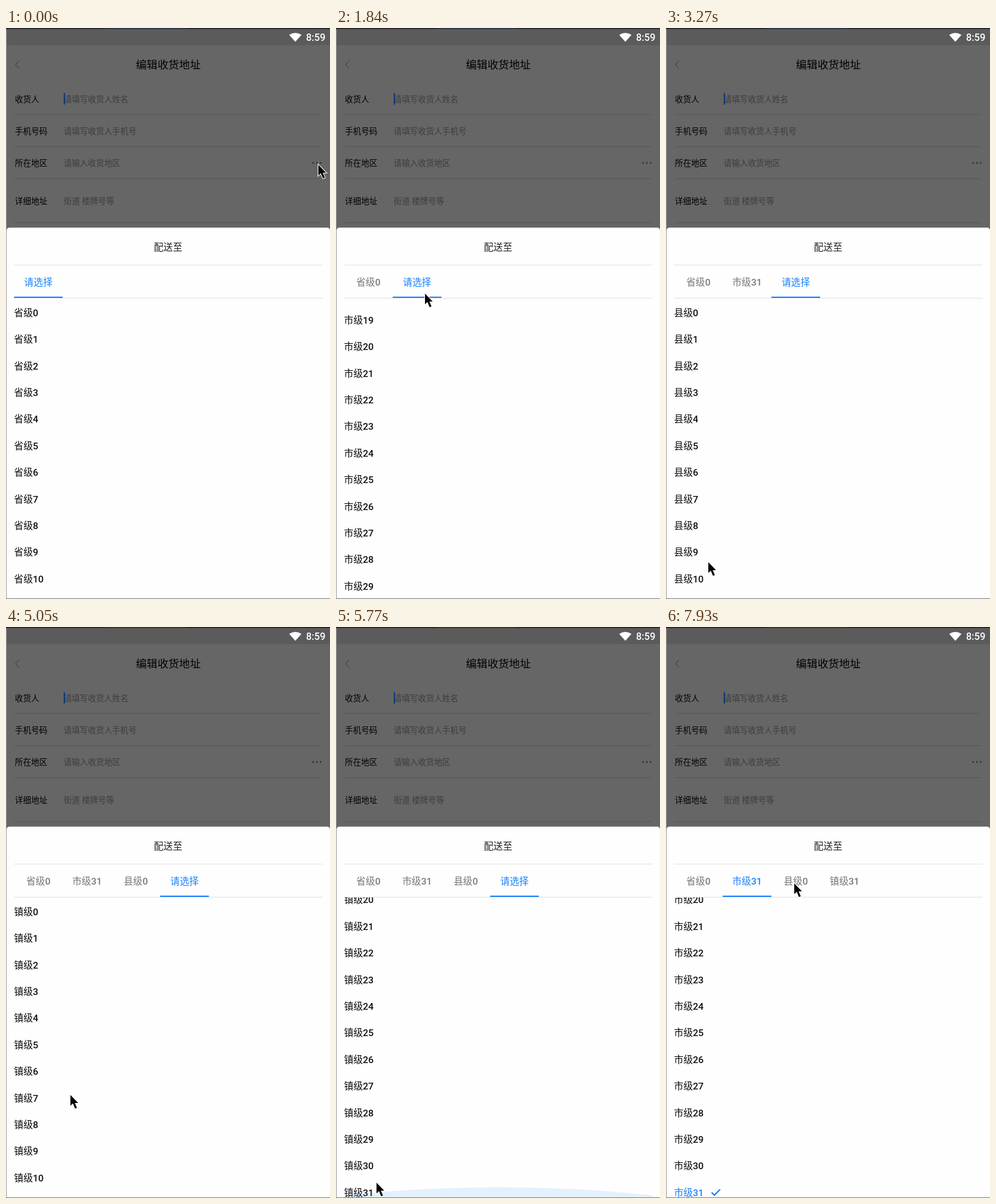
Animation of 528x931 px, one loop 8 s. Source, as an HTML page:

```html
<!DOCTYPE html>
<html lang="zh-CN">
<head>
<meta charset="utf-8">
<title>编辑收货地址</title>
<style>
html, body { margin: 0; width: 100%; height: 100%; overflow: hidden; background: #666; }
svg { display: block; width: 100%; height: 100%; }
text { font-family: Roboto, "Noto Sans CJK SC", "Noto Sans CJK", sans-serif; font-size: 15.4px; white-space: pre; }
.num { font-weight: 500; }
.form text { font-size: 13.2px; }
.mid { text-anchor: middle; }
</style>
</head>
<body>
<svg id="stage" viewBox="0 0 528 931">
  <defs>
    <clipPath id="listClip"><rect x="1" y="441" width="527" height="489"/></clipPath>
  </defs>
  <rect width="528" height="931" fill="#666"/>
  <rect width="528" height="28" fill="#5b5b5b"/>
  <rect width="528" height="1.5" fill="#1d1d22"/>
  <rect x="163" width="132" height="1" fill="#24304a"/>
  <path d="M461.5 11.2Q471.5 4.6 481.5 11.2L471.5 22.6Z" fill="#fff"/>
  <text x="489" y="21" fill="#fff" class="num" style="font-size:16px">8:59</text>
  <path d="M21.5 53.5L15.5 59.8L21.5 66" fill="none" stroke="#4a4a4a" stroke-width="1.1"/>
  <text x="264.5" y="66" class="mid" style="font-size:17.6px;font-weight:500">编辑收货地址</text>
  <g id="form" class="form"></g>
  <rect x="94" y="106" width="2" height="19" fill="#0b3b7c"/>
  <g fill="#333"><circle cx="500.5" cy="220" r="1.4"/><circle cx="506.6" cy="220" r="1.4"/><circle cx="512.7" cy="220" r="1.4"/></g>

  <path d="M1 931V330.5Q1 325.5 6 325.5H523Q528 325.5 528 330.5V931Z" fill="#fefefe"/>
  <path d="M.5 2V931" stroke="#9a9a9a"/>
  <text x="264.2" y="363" class="mid" fill="#1f1f1f">配送至</text>
  <path d="M13 386.5H516" stroke="#e4e4e4"/>
  <path d="M13 440.5H516" stroke="#dcdfe2"/>
  <g id="tabs"></g>
  <rect id="underline" y="438" width="79.4" height="2" fill="#1a80ff"/>
  <g clip-path="url(#listClip)">
    <g id="rows"></g>
    <path id="check" fill="none" stroke="#1a80ff" stroke-width="2.2"/>
    <path id="glow" fill="#1a80ff"/>
  </g>
  <path d="M0 930.5H528" stroke="#777"/>
  <path id="pointer" d="M1 1V18.5L5 14.8L8.6 23.2L11.6 22L8.2 13.9H13.6Z" stroke="#fff" stroke-width="2" paint-order="stroke"/>
</svg>
<script>
const LOOP = 8000, FRAME = 140, BLUE = '#1a80ff';
const PITCH = 43.4, FIRST_ROW = 464, ROW_COUNT = 32, TAB_WIDTH = 79.4;
const DRAGGED = 812.6, SCROLL_END = 887.4, BACK_TO_CITY = 7500;
const levels = ['省级', '市级', '县级', '镇级'];
const picks = [{ at: 960, n: 0 }, { at: 3030, n: 31 }, { at: 4390, n: 0 }, { at: 6290, n: 31 }];

const home = { x: 508, y: 222 };
const moves = [
  { from: 0, to: 690, x: 58, y: 475 },
  { from: 960, to: 1390, x: 116, y: 790 },
  { from: 1390, to: 1840, x: 144, y: 432 },
  { from: 1840, to: 2120, x: 106, y: 840 },
  { from: 2120, to: 2660, x: 54, y: 905 },
  { from: 3030, to: 3270, x: 68, y: 870 },
  { from: 3270, to: 4110, x: 48, y: 455 },
  { from: 4390, to: 5050, x: 104, y: 762 },
  { from: 5050, to: 5320, x: 101, y: 349 },
  { from: 5320, to: 5770, x: 65, y: 905 },
  { from: 5770, to: 5920, x: 54, y: 906 },
  { from: 6290, to: 7230, x: 132, y: 417 },
  { from: 7500, to: 7930, x: 208, y: 417 }
];

const $ = id => document.getElementById(id);
const set = (el, attrs) => { for (const k in attrs) el.setAttribute(k, attrs[k]); return el; };
const add = (parent, tag, attrs = {}) =>
  set(parent.appendChild(document.createElementNS('http://www.w3.org/2000/svg', tag)), attrs);

function ramp(t, from, to) {
  const p = Math.min(1, Math.max(0, (t - from) / (to - from)));
  const steps = Math.round((to - from) / FRAME);
  return Math.floor(p * steps + 1e-6) / steps;
}
const smooth = p => p * p * (3 - 2 * p);
const pulse = (t, from, peak, to) => ramp(t, from, peak) - ramp(t, peak, to);

function pointerAt(t) {
  return moves.reduce((pos, m) => {
    const p = smooth(ramp(t, m.from, m.to));
    return { x: pos.x + (m.x - pos.x) * p, y: pos.y + (m.y - pos.y) * p };
  }, home);
}

function scrollAt(t, level) {
  if (level === 1) return DRAGGED * ramp(t, 1390, 1840) ** 2 + (SCROLL_END - DRAGGED) * ramp(t, 1840, 1970);
  if (level === 3) return SCROLL_END * smooth(ramp(t, 5050, 5620));
  return 0;
}

function makeLabel(parent, attrs) {
  const el = add(parent, 'text', attrs);
  const word = add(el, 'tspan'), num = add(el, 'tspan', { class: 'num' });
  return (w, n, fill, more) => {
    word.textContent = w;
    num.textContent = n;
    set(el, { fill, ...more });
  };
}

[['收货人', '请填写收货人姓名', 116, 141], ['手机号码', '请填写收货人手机号', 168, 193.5],
 ['所在地区', '请输入收货地区', 220, 245.5], ['详细地址', '街道 楼牌号等', 282, 317.5]]
  .forEach(([name, hint, y, line]) => {
    add($('form'), 'text', { x: 14.6, y: y + 5 }).textContent = name;
    add($('form'), 'text', { x: 94, y: y + 5, fill: '#3d3d3d' }).textContent = hint;
    add($('form'), 'path', { d: `M14 ${line}H514`, stroke: '#565656' });
  });

const tabs = levels.map((_, i) =>
  makeLabel($('tabs'), { x: 13 + TAB_WIDTH * (i + .5), y: 420, class: 'mid' }));
const rows = Array.from({ length: 13 }, () => makeLabel($('rows'), { x: 13 }));

function render(t) {
  const done = picks.filter(p => p.at <= t).length;
  const level = t >= BACK_TO_CITY ? 1 : Math.min(done, 3);
  const chosen = level < done ? picks[level].n : -1;
  const scroll = scrollAt(t, level);
  const rowY = n => FIRST_ROW + n * PITCH - scroll;

  tabs.forEach((draw, i) => {
    const fill = i === level ? BLUE : '#777';
    if (i < done) draw(levels[i], picks[i].n, fill);
    else draw(i === done ? '请选择' : '', '', fill);
  });
  set($('underline'), { x: 13 + TAB_WIDTH * level });

  const first = Math.floor(scroll / PITCH);
  rows.forEach((draw, i) => {
    const n = first + i, shown = n < ROW_COUNT;
    draw(shown ? levels[level] : '', shown ? n : '', n === chosen ? BLUE : '#0c0c0c',
      { y: Math.round(rowY(n) + 5.8) });
  });
  set($('check'), {
    d: `M74.4 ${rowY(chosen)}l4.4 4.4l9.4 -9.4`,
    visibility: chosen < 0 ? 'hidden' : 'visible'
  });

  const glow = pulse(t, 1840, 2120, 2660) + pulse(t, 5470, 5620, 5920);
  const top = 945 - 63 * glow, edge = top + 26 * glow;
  set($('glow'), {
    d: `M13 ${edge}Q264.5 ${2 * top - edge} 516 ${edge}V945H13Z`,
    opacity: .23 * glow
  });

  const { x, y } = pointerAt(t);
  set($('pointer'), { transform: `translate(${x} ${y})` });
}

const start = performance.now();
function loop() {
  render((performance.now() - start) % LOOP);
  requestAnimationFrame(loop);
}
loop();
</script>
</body>
</html>
```
